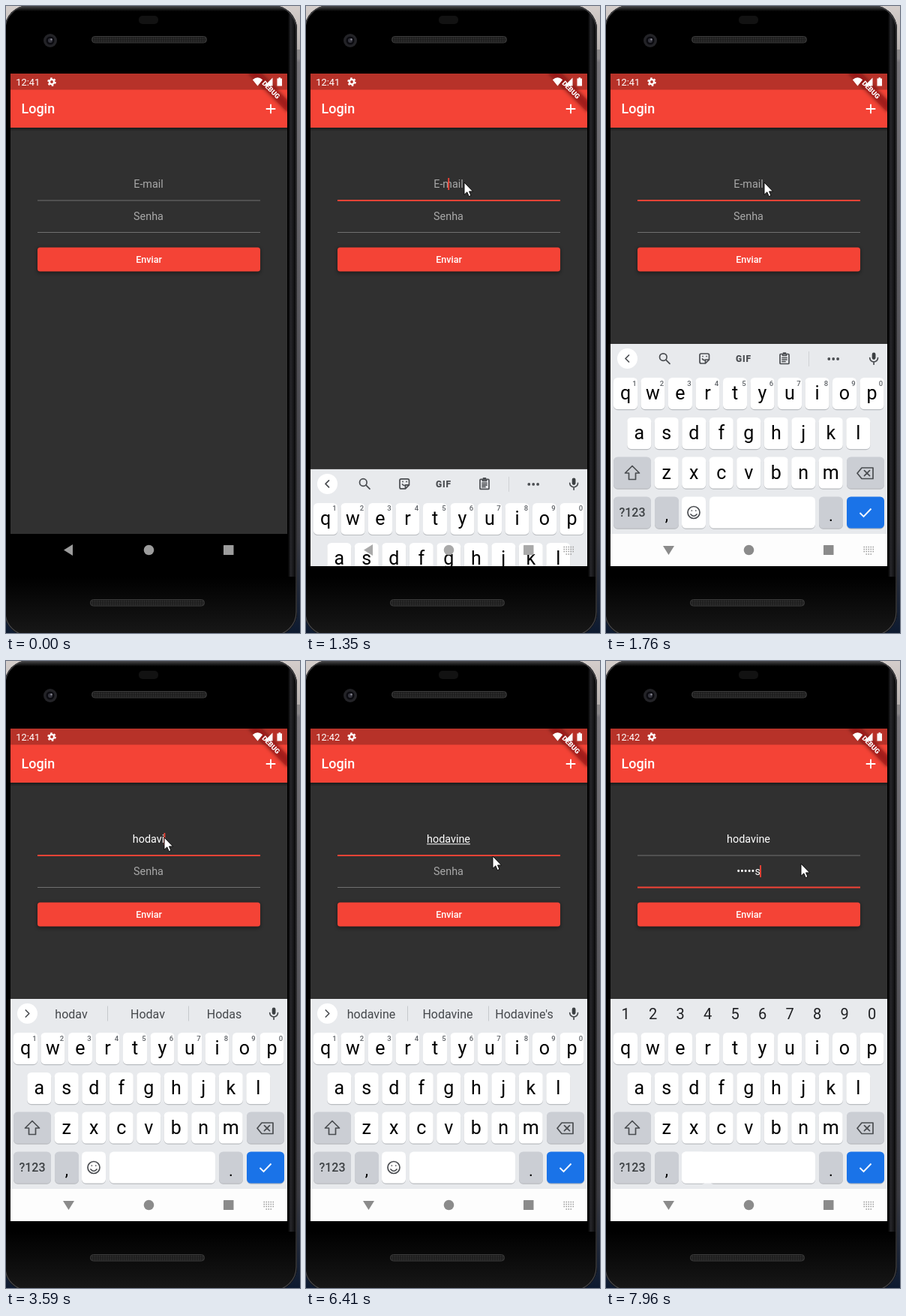
Animation of 392 by 835 pixels, one loop 8000 ms. Source, as an HTML page:

```html
<!DOCTYPE html>
<html lang="pt">
<head>
<meta charset="utf-8">
<title>Login</title>
<style>
html, body { margin: 0; width: 100%; height: 100%; overflow: hidden; background: #000; }
svg { display: block; width: 392px; height: 835px; font-family: Roboto, sans-serif; }
.mid { text-anchor: middle; }
.line { fill: none; stroke: #4a4d51; stroke-width: 1.7; stroke-linecap: round; stroke-linejoin: round; }
.field { font-size: 14.37px; text-anchor: middle; }
</style>
</head>
<body>
<svg viewBox="0 0 392 835">
  <defs>
    <linearGradient id="desk" x1="0" y1="0" x2="0" y2="1">
      <stop offset="0" stop-color="#d5cecb"/><stop offset=".07" stop-color="#b9b3b1"/>
      <stop offset=".09" stop-color="#77757a"/><stop offset=".45" stop-color="#5a595e"/>
      <stop offset=".85" stop-color="#3a3a40"/><stop offset="1" stop-color="#0d1a30"/>
    </linearGradient>
    <linearGradient id="rim" x1="0" y1="0" x2="1" y2="0">
      <stop offset="0" stop-color="#000"/><stop offset=".3" stop-color="#26262a"/>
      <stop offset=".7" stop-color="#101012"/><stop offset="1" stop-color="#000"/>
    </linearGradient>
    <linearGradient id="top" x1="0" y1="0" x2="0" y2="1">
      <stop offset="0" stop-color="#4a4a4c"/><stop offset="1" stop-color="#000"/>
    </linearGradient>
    <linearGradient id="base" x1="0" y1="0" x2="0" y2="1">
      <stop offset="0" stop-color="#000"/><stop offset="1" stop-color="#171717"/>
    </linearGradient>
    <linearGradient id="shade" x1="0" y1="0" x2="0" y2="1">
      <stop offset="0" stop-opacity=".45"/><stop offset="1" stop-opacity="0"/>
    </linearGradient>
    <pattern id="mesh" width="3" height="3" patternUnits="userSpaceOnUse">
      <rect width="3" height="3" fill="#1c1c1c"/><circle cx="1.5" cy="1.5" r=".9" fill="#333"/>
    </pattern>
    <filter id="blur" x="-20%" y="-80%" width="140%" height="260%"><feGaussianBlur stdDeviation="2.4"/></filter>
    <clipPath id="screen"><rect x="6" y="90" width="369" height="613"/></clipPath>
    <clipPath id="panel"><rect x="6" y="90" width="369" height="656"/></clipPath>
    <clipPath id="body"><rect x="-2" y="-1" width="390" height="840" rx="32"/></clipPath>
  </defs>

  <!-- phone -->
  <rect width="392" height="835" fill="url(#desk)"/>
  <rect x="385" y="58" width="7" height="11" fill="#8d8a8b"/>
  <g clip-path="url(#body)">
    <rect width="392" height="835"/>
    <rect x="376" width="12" height="835" fill="url(#rim)"/>
    <rect width="392" height="7" fill="url(#top)"/>
    <rect y="760" width="392" height="75" fill="url(#base)"/>
  </g>
  <rect x="-1" y="0" width="388" height="838" rx="31" fill="none" stroke="#454548" stroke-width="1.2"/>
  <rect x="177" y="13" width="26" height="11" rx="5" fill="#121212"/>
  <circle cx="59" cy="46" r="9" fill="#232327"/>
  <circle cx="59" cy="46" r="5.5" fill="#0b0b10"/>
  <circle cx="59" cy="46" r="3" fill="#34343d"/>
  <circle cx="60.5" cy="44.5" r="1.2" fill="#8d8d98"/>
  <g fill="url(#mesh)" stroke="#3b3b3b">
    <rect x="114.5" y="40.5" width="153" height="8.5" rx="4"/>
    <rect x="112.5" y="790.5" width="152" height="8.5" rx="4"/>
  </g>

  <!-- app -->
  <g clip-path="url(#screen)">
    <rect x="6" y="90" width="369" height="613" fill="#303030"/>
    <rect x="6" y="162" width="369" height="5" fill="url(#shade)"/>
    <rect x="6" y="111" width="369" height="51" fill="#f44336"/>
    <rect x="6" y="90" width="369" height="21.5" fill="#b73229"/>
    <text x="20.5" y="143.3" font-size="17.96" font-weight="500" fill="#fff">Login</text>
    <path d="M346.7 137h12.6M353 130.7v12.6" stroke="#fff" stroke-width="1.8"/>
    <g transform="translate(375 90) rotate(45)">
      <rect x="-36" y="25.1" width="72" height="10.8" opacity=".5" filter="url(#blur)"/>
      <rect x="-36" y="25.1" width="72" height="10.8" fill="#b71c1c" opacity=".63"/>
      <text class="mid" y="33.8" font-size="9.16" font-weight="900" fill="#fff">DEBUG</text>
    </g>
    <g fill="#fff">
      <text id="clock" x="13.3" y="105.6" font-size="12.8"></text>
      <g fill="none" stroke="#fff">
        <circle cx="61" cy="101" r="3.1" stroke-width="2.4"/>
        <circle cx="61" cy="101" r="4.9" stroke-width="1.8" stroke-dasharray="2.6 2.53"/>
      </g>
      <path d="M328.8 98.2Q335.5 92.4 342.2 98.2L335.5 106.5ZM355.5 95.5v11h-11zM361.5 96.5h2v-1.3h2.5v1.3h2v10h-6.5z"/>
    </g>
    <rect x="42" y="322.5" width="297" height="33" rx="3" opacity=".45" filter="url(#blur)"/>
    <rect x="42" y="321.5" width="297" height="32" rx="3.5" fill="#f44336"/>
    <text class="mid" x="190.5" y="342.3" font-size="12.57" font-weight="500" fill="#fff">Enviar</text>
    <rect id="line1" x="42" width="297"/>
    <rect id="line2" x="42" width="297"/>
    <text id="mail" class="field" x="190" y="242"></text>
    <text id="pass" class="field" x="190" y="285"></text>
    <rect id="mailUnder" y="243.3" height="1" fill="#fff"/>
    <rect id="caret" width="1.8" height="16" fill="#f44336"/>
  </g>

  <!-- keyboard -->
  <g clip-path="url(#panel)">
    <g id="sheet">
      <rect x="6" y="450" width="369" height="254" fill="#e8eaed"/>
      <rect x="6" y="703" width="369" height="43" fill="#fdfdfd"/>
      <g id="strip">
        <circle cx="28.5" cy="469.5" r="13.5" fill="#fff"/>
        <path id="chevron" class="line" d="M30.5 465l-4.5 4.5 4.5 4.5"/>
        <rect x="354.7" y="461.5" width="4.8" height="9.5" rx="2.4" fill="#3c4043"/>
        <path class="line" d="M351.7 468.5a5.4 5.4 0 0 0 10.8 0M357.1 474v3.2"/>
      </g>
      <g id="tools">
        <g class="line">
          <circle cx="76.3" cy="467.6" r="4.8"/><path d="M80 471.3l5 5"/>
          <path d="M127 463h8.500q2 0 2 2v6l-5 5h-5.500q-2 0-2-2v-9q0-2 2-2M132.500 476v-5h5M128.500 470q1.300 2 3.500 1.500M129 466.500h.1M134 466.500h.1"/>
          <path d="M233 463.500h10q1 0 1 1v11q0 1-1 1h-10q-1 0-1-1v-11q0-1 1-1M235.500 463.500v2h5v-2M235 468.500h6M235 471h6M235 473.500h4M236.500 462h3"/>
        </g>
        <text class="mid" x="183.500" y="473.700" font-size="12" font-weight="900" letter-spacing=".8" fill="#4a4d51">GIF</text>
        <path d="M270.500 460v20" stroke="#d0d2d5"/>
        <g fill="#4a4d51"><circle cx="297.300" cy="470" r="1.900"/><circle cx="303.200" cy="470" r="1.900"/><circle cx="309.100" cy="470" r="1.900"/></g>
      </g>
      <g id="words" class="mid" font-size="16" fill="#44474b">
        <path d="M135.5 459.500v20M243.5 459.500v20" stroke="#c6c9cc"/>
        <text x="87" y="475.7"></text><text x="189" y="475.7"></text><text x="291" y="475.7"></text>
      </g>
      <g id="digits" class="mid" font-size="20" fill="#202124"></g>
      <g id="keys"></g>
      <g id="hints" class="mid" font-size="9.5" font-weight="500" fill="#5f6368"></g>
      <g id="emoji" class="line"><circle cx="117" cy="674.500" r="8"/><path d="M113 677q4 4.500 8 0M114.300 672h.1M119.700 672h.1"/></g>
      <path class="line" d="M35 612.500l9.500 9.500h-5v8.500h-9v-8.500h-5zM341 615h15v14.500h-15l-6-7.250zM344.500 618.700l7 7M351.500 618.700l-7 7"/>
      <path d="M338.500 675l5 5 10-10.500" fill="none" stroke="#fff" stroke-width="1.900"/>
    </g>
  </g>

  <g id="nav">
    <path id="back" d="M77 724.500l12-7.500v15z"/>
    <circle cx="190.500" cy="724.500" r="6.800"/>
    <rect x="290" y="718" width="13.500" height="13" rx=".5"/>
    <path id="ime" d="M343.500 720.500h13.500M343.500 723.500h13.500M343.500 726.500h13.500M346.500 730h7.500" stroke="#9a9a9a" stroke-width="1.500" stroke-dasharray="1.500 1.500"/>
  </g>
  <path id="mouse" d="M0 0v16.300l3.800-3.500 2.500 5.800 2.700-1.200-2.500-5.500h5z" fill="#fff" stroke="#000" stroke-width=".9"/>
</svg>
<script>
const $ = id => document.getElementById(id);
const set = (el, attrs) => { for (const k in attrs) el.setAttribute(k, attrs[k]); };
const show = (el, on) => el.setAttribute('visibility', on ? 'visible' : 'hidden');
const ramp = (t, a, b) => Math.min(1, Math.max(0, (t - a) / (b - a)));
const mix = (a, b, u) => a + (b - a) * u;
const last = (list, t) => list.filter(s => s[0] <= t).pop();

const PITCH = 36.5, GREY = '#cbced4';
const key = (x, y, w, fill = '#fff', id = '') =>
  `<rect x="${x}" y="${y + 1.2}" width="${w}" height="42" rx="5.5" fill="#b9bcc0"/>
   <rect id="${id}" x="${x}" y="${y}" width="${w}" height="42" rx="5.5" fill="${fill}"/>`;
const label = (s, x, y, size = 25, extra = '') =>
  `<text class="mid" x="${x}" y="${y}" font-size="${size}" ${extra}>${s}</text>`;

let keys = '';
[['qwertyuiop', 26, 495], ['asdfghjkl', 44.3, 548], ['zxcvbnm', 80.7, 600.5]].forEach(([row, x, y]) =>
  [...row].forEach((c, i) => keys += key(x + i * PITCH - 16, y, 32) + label(c, x + i * PITCH, y + 29)));
keys += key(10, 600.5, 50, GREY) + key(321, 600.5, 50, GREY)
  + key(10, 653.5, 50, GREY) + key(65, 653.5, 32, GREY) + key(284, 653.5, 32, GREY)
  + key(321, 653.5, 50, '#1a73e8') + key(101, 653.5, 32) + key(138, 653.5, 141, '#fff', 'space')
  + label('?123', 35, 680, 16, 'font-weight="500" fill="#3c4043"') + label(',', 81, 685, 22) + label('.', 300, 686, 22);
$('keys').innerHTML = keys;
[...'1234567890'].forEach((d, i) => {
  $('digits').innerHTML += `<text x="${26 + i * PITCH}" y="477.300">${d}</text>`;
  $('hints').innerHTML += `<text x="${38 + i * PITCH}" y="505.500">${d}</text>`;
});

// time, text, composing underline
const mailSteps = [
  [0, ''], [2440, 'h'], [2510, 'ho'], [2580, 'ho', 1], [3250, 'hod', 1], [3450, 'hoda'], [3520, 'hodav'],
  [3590, 'hodavi'], [3730, 'hodavin'], [3870, 'hodavine'], [4010, 'hodavine', 1], [4470, 'hodavineh'],
  [4600, 'hodavineh='], [5130, 'hodavineh'], [5270, 'hodavine'], [5400, 'hodavine', 1], [6850, 'hodavine']
];
const full = 'hodavine Hodavine Hodavine\'s';
const wordSteps = [
  [2580, 'how hot home'], [3250, 'hod hold hood'], [3520, 'hodav Hodav Hodas'], [3660, 'hodavi Hodavi Hodavis'],
  [3940, full], [4540, 'hodavineh Hodavineh Hodavines'], [4670, 'to I you'], [5340, full]
];
const passSteps = [[0, 0], [7680, 2], [7750, 3], [7820, 4], [7890, 5], [7960, 6]];
const caretOn = [[1090, 1740], [2240, 2980], [3250, 6010], [6850, 7350], [7680, 8000]];
const path = [[950, 211, 235], [5940, 211, 235], [6090, 244, 258], [6400, 244, 258],
  [6410, 249, 260], [6430, 249, 260], [6780, 260, 270], [8000, 260, 270]];

function mouseAt(t) {
  if (t < 950) {
    const u = 1 - (1 - ramp(t, 200, 950)) ** 2;
    return [mix(266, 211, u) - 9 * Math.sin(Math.PI * u), mix(801, 235, u)];
  }
  const i = path.findIndex(p => p[0] > t), a = path[i - 1], b = path[i], u = ramp(t, a[0], b[0]);
  return [mix(a[1], b[1], u), mix(a[2], b[2], u)];
}

function underline(el, y, f) {
  const h = f > 0 ? mix(1, 2, f) : 1;
  set(el, { y: y - h / 2, height: h, fill: `rgb(${mix(112, 244, f)},${mix(112, 67, f)},${mix(112, 54, f)})` });
}

function field(el, text, hint) {
  el.textContent = text || hint;
  el.setAttribute('fill', text ? '#fff' : '#a9a9a9');
  return text ? el.getComputedTextLength() : 0;
}

function draw(t) {
  const onPass = t >= 6850, numeric = t >= 6920;
  $('clock').textContent = t < 5200 ? '12:41' : '12:42';

  const [, mail, composing] = last(mailSteps, t);
  const count = last(passSteps, t)[1];
  const mailW = field($('mail'), mail, 'E-mail');
  const passW = field($('pass'), count ? '•'.repeat(count - 1) + 's' : '', 'Senha');
  set($('mailUnder'), { x: 190 - mailW / 2, width: mailW });
  show($('mailUnder'), composing);
  const swap = ramp(t, 6850, 7000);
  underline($('line1'), 259, ramp(t, 1090, 1250) - swap);
  underline($('line2'), 301.5, swap);
  set($('caret'), { x: 189.3 + (onPass ? passW : mailW) / 2, y: onPass ? 272 : 229 });
  show($('caret'), caretOn.some(([a, b]) => t >= a && t < b));

  const rise = 1 - (1 - ramp(t, 1280, 1565)) ** 2;
  set($('sheet'), { transform: `translate(0 ${296 * (1 - rise)})` });
  show($('sheet'), rise > 0);
  const words = last(wordSteps, t), up = rise > 0;
  show($('strip'), up && !numeric);
  show($('tools'), up && !words);
  show($('words'), up && words && !numeric);
  show($('digits'), numeric);
  show($('hints'), up && !numeric);
  show($('emoji'), up && !numeric);
  set($('space'), numeric ? { x: 101, width: 178 } : { x: 138, width: 141 });
  set($('chevron'), { transform: words ? 'rotate(180 28.4 469.5)' : '' });
  if (words) words[1].split(' ').forEach((w, i) => $('words').querySelectorAll('text')[i].textContent = w);

  set($('nav'), { fill: !up ? '#9c9c9c' : rise < 1 ? '#a9a9a9' : '#8b8b8b' });
  set($('back'), { transform: `rotate(${-90 * ramp(t, 1420, 1620)} 83.500 724.500)` });
  show($('ime'), up);

  show($('mouse'), t >= 250);
  set($('mouse'), { transform: `translate(${mouseAt(t)})` });
}

function loop() {
  draw(performance.now() % 8000);
  requestAnimationFrame(loop);
}
loop();
</script>
</body>
</html>
```
